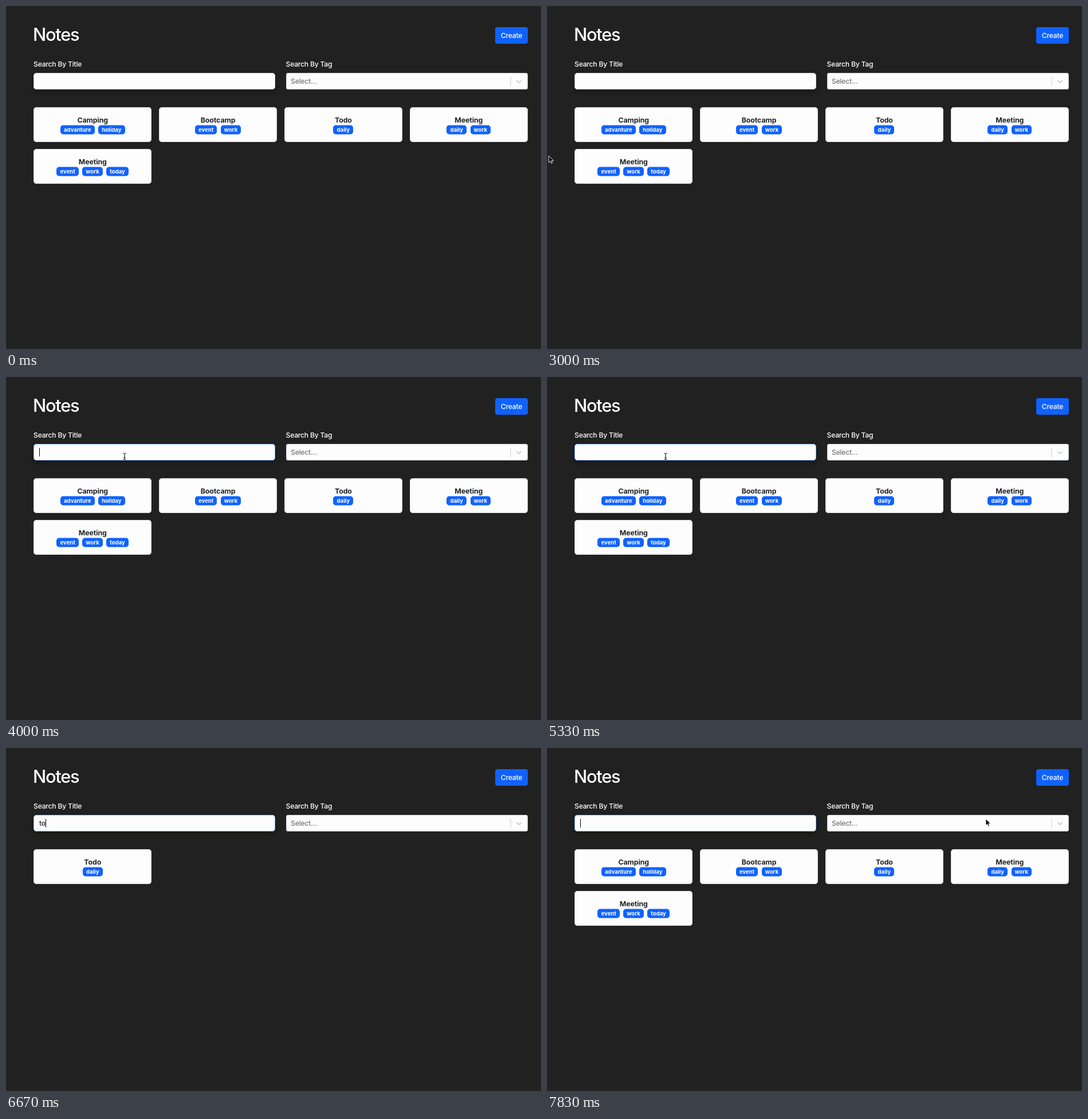
Recreate the animation shown at these times as an HTML page. Size 934x600 px, loop 8 s.

```html
<!DOCTYPE html>
<html lang="en">
<head>
<meta charset="utf-8">
<title>Notes</title>
<style>
  * { box-sizing: border-box; }
  html, body { margin: 0; width: 100%; height: 100%; overflow: hidden; background: #212121; }
  body { position: relative; font: 500 12.2px/18px Inter, sans-serif; letter-spacing: -.02em; color: #fff; }
  body > * { position: absolute; white-space: pre; }
  h1 { left: 47px; top: 30px; margin: 0; font-size: 30.8px; line-height: 40px; font-weight: 550; letter-spacing: -1.3px; }
  .create { left: 854px; top: 37px; width: 57px; height: 29px; line-height: 29.5px; text-align: center; background: #1062fe; border-radius: 4px; }
  label { top: 92.5px; }
  .field { top: 117px; width: 422px; height: 29px; line-height: 27.5px; background: #fdfdfd; border: 1px solid #ced4da; }
  #title { left: 48px; padding-left: 9px; color: #212529; border-radius: 4.7px; box-shadow: 0 4px 9px rgba(0,0,0,.3); }
  #title.focus { border-color: #86b7fe; }
  #caret { display: inline-block; width: 1px; height: 15px; margin-right: -1px; background: #000; vertical-align: -3px; }
  .select { left: 489px; padding-left: 7px; color: #777; border-radius: 3px; }
  .select svg { position: absolute; right: 0; top: 0; }
  #cards { left: 48px; top: 177px; width: 863px; display: grid; grid-template-columns: repeat(4, 1fr); gap: 12px 12.4px; }
  .card { height: 61px; padding-top: 13px; text-align: center; color: #212529; background: #fdfdfd; border: 1px solid #d8d8d8; border-radius: 4.7px; }
  .card b { display: block; font-size: 12.4px; font-weight: 700; letter-spacing: -.1px; }
  .tags { display: flex; justify-content: center; gap: 6.3px; transform: translateY(-.5px); }
  .tags i { height: 16px; padding: 0 6.1px; font: 700 9.6px/16px Inter, sans-serif; letter-spacing: 0; color: #fff; background: #1062fe; border-radius: 4.7px; }
  #pointer { left: 0; top: 0; overflow: visible; }
</style>
</head>
<body>
<h1>Notes</h1>
<div class="create">Create</div>
<label style="left:48px">Search By Title</label>
<label style="left:488.5px">Search By Tag</label>
<div class="field" id="title"><span id="query"></span><span id="caret"></span></div>
<div class="field select">Select...<svg width="30" height="28" fill="none" stroke="#ccc"><path d="M.9 6v16"/><path d="M11.3 12.2l4 4 4-4" stroke-width="1.7"/></svg></div>
<div id="cards"></div>
<svg id="pointer" width="1" height="1">
  <path id="arrow" d="M0 0v11.6l2.7-2.5 1.7 4.1 2-.8-1.7-4h3.7z" stroke="#fff" stroke-width=".9"/>
  <path id="beam" d="M-2.5-5.5q2.5 0 2.5 1.5v8q0 1.5-2.5 1.5M2.5-5.5q-2.5 0-2.5 1.5M0 4q0 1.5 2.5 1.5M-1.5 2h3" fill="none" stroke="#000"/>
</svg>
<script>
// All times below are in steps, six per second.
const LOOP = 8000, STEPS_PER_SECOND = 6, BLINK = 2.7;
const CLICK = 23, TYPE = 33, REAPPEAR = 46;
const $ = id => document.getElementById(id);

const notes = [
  ['Camping', 'advanture', 'holiday'],
  ['Bootcamp', 'event', 'work'],
  ['Todo', 'daily'],
  ['Meeting', 'daily', 'work'],
  ['Meeting', 'event', 'work', 'today'],
];
const cards = notes.map(([name, ...tags]) => {
  const card = document.createElement('div');
  card.className = 'card';
  card.innerHTML = `<b>${name}</b><div class="tags">${tags.map(t => `<i>${t}</i>`).join('')}</div>`;
  $('cards').append(card);
  return card;
});

const edits = [
  { time: CLICK, query: '' },
  { time: TYPE, query: 't' },
  { time: TYPE + 1, query: 'to' },
  { time: 41, query: 't' },
  { time: 41.6, query: '' },
];

// The pointer rests wherever its last move ended.
const entry = { x: 30, y: 419 };
const moves = [
  { from: 4, to: 10, x: 5, y: 266 },
  { from: 11, to: 14, x: 3, y: 256 },
  { from: 16, to: 18, x: 3, y: 262 },
  { from: 18, to: 20, x: 150, y: 256 },
  { from: 20, to: 21, x: 210, y: 147 },
  { from: 21, to: CLICK, x: 207, y: 139 },
  { from: 45, to: 47, x: 766, y: 124 },
];

const clamp = v => Math.min(1, Math.max(0, v));
const ease = u => u * u * (3 - 2 * u);

function pointerAt(step) {
  return moves.reduce((p, m) => {
    const u = ease(clamp((step - m.from) / (m.to - m.from)));
    return { x: p.x + (m.x - p.x) * u, y: p.y + (m.y - p.y) * u };
  }, entry);
}

// A hovered card rises toward its peak time, then settles back.
function raise(card, step, peak) {
  const d = 2 * clamp(1 - Math.abs(step - peak) / 1.5);
  card.style.transform = d ? `translate(${d}px, ${-d}px)` : '';
}

function draw(step) {
  const edit = edits.findLast(e => e.time <= step);
  const query = edit ? edit.query : '';
  const caretOn = edit && Math.floor((step - edit.time) / BLINK + 1e-6) % 2 === 0;
  $('query').textContent = query;
  $('title').classList.toggle('focus', !!edit);
  $('caret').style.visibility = caretOn ? 'visible' : 'hidden';
  cards.forEach((card, i) => {
    card.style.display = notes[i][0].toLowerCase().includes(query) ? '' : 'none';
  });

  raise(cards[4], step, 20.3);
  raise(cards[0], step, 21.3);

  const { x, y } = pointerAt(step);
  const inField = x > 48 && x < 470 && y > 117 && y < 146;
  const visible = step >= moves[0].from && step < TYPE || step >= REAPPEAR;
  $('pointer').style.display = visible ? '' : 'none';
  $('pointer').style.transform = `translate(${x}px, ${y}px)`;
  $('beam').style.display = inField ? '' : 'none';
  $('arrow').style.display = inField ? 'none' : '';
}

let shown = -1;
function tick() {
  const step = Math.floor((performance.now() % LOOP) / 1000 * STEPS_PER_SECOND + .05);
  if (step !== shown) draw(shown = step);
  requestAnimationFrame(tick);
}
tick();
</script>
</body>
</html>
```
